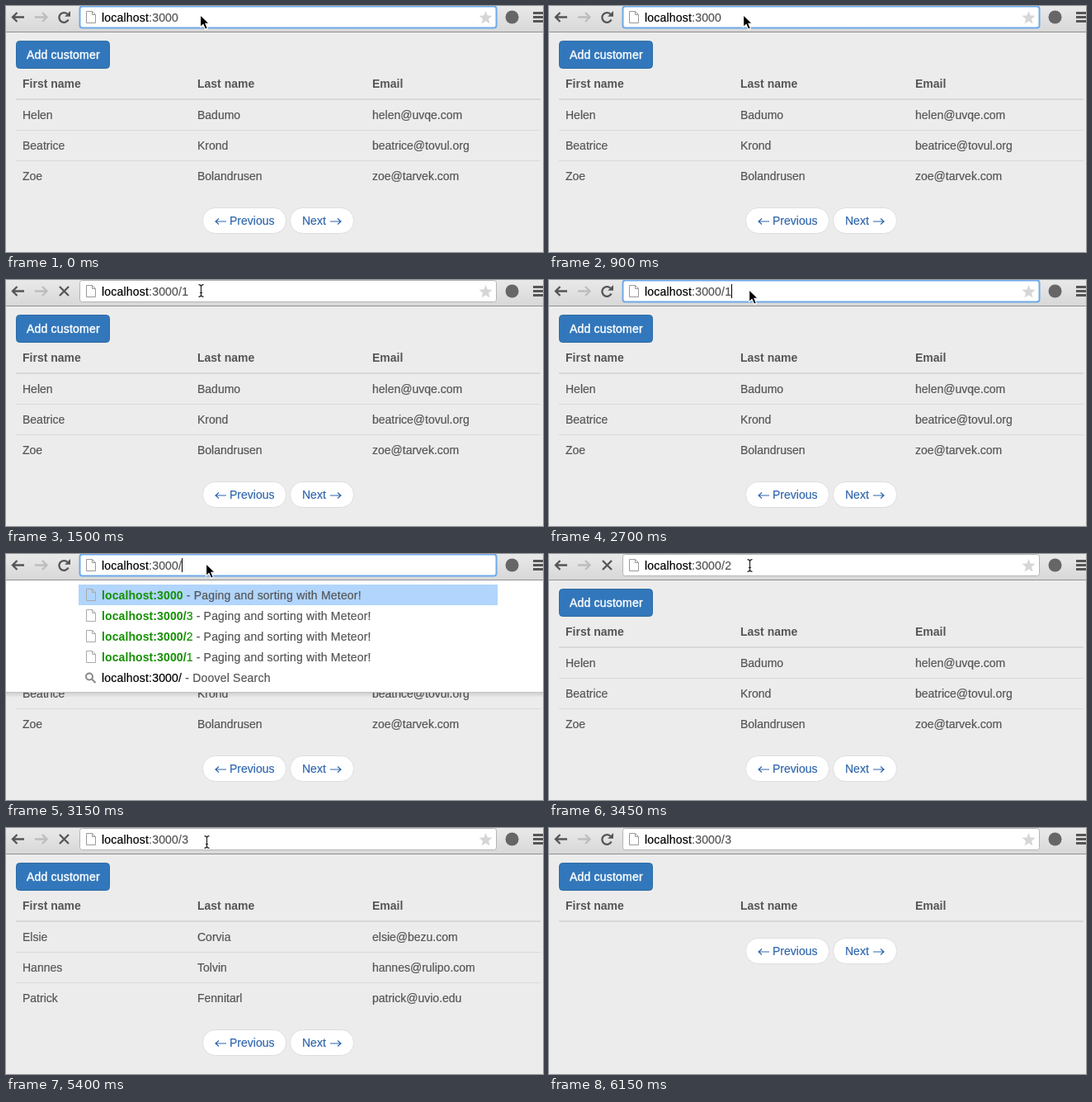
Write an HTML page that moves like this. It is 651 by 298 pixels and loops after 6580 ms.

```html
<!DOCTYPE html>
<html lang="en">
<head>
<meta charset="utf-8">
<title>Paging demo</title>
<style>
  html, body { margin: 0; width: 100%; height: 100%; overflow: hidden; background: #ececec; }
  svg { display: block; color: #555; }
  text { font: 14px "Liberation Sans", Arial, sans-serif; white-space: pre; }
  text, tspan { fill: currentColor; stroke: currentColor; stroke-width: .2px; }
  .bold { font-weight: bold; stroke-width: 0; }
  .wide { letter-spacing: .2px; }
  .black { color: #000; }
  .link { color: #2f66ad; }
  .label { color: #fff; letter-spacing: .2px; stroke-width: .4px; }
  .hit { color: #149000; letter-spacing: .1px; }
  .line { fill: none; stroke: #555; stroke-width: 2.3; }
  .pale { stroke: #bdbdbd; }
  .lens { stroke: #888; stroke-width: 2; }
  .arrow { stroke: #2f66ad; stroke-width: 1.2; }
</style>
</head>
<body>
<svg id="stage" width="651" height="298" viewBox="0 0 651 298"></svg>
<script>
const LOOP = 6580;
const TITLE = ' - Paging and sorting with Meteor!';
const PAGES = {
  first: [
    ['Helen', 'Badumo', 'helen@uvqe.com'],
    ['Beatrice', 'Krond', 'beatrice@tovul.org'],
    ['Zoe', 'Bolandrusen', 'zoe@tarvek.com']
  ],
  second: [
    ['Elsie', 'Corvia', 'elsie@bezu.com'],
    ['Hannes', 'Tolvin', 'hannes@rulipo.com'],
    ['Patrick', 'Fennitarl', 'patrick@uvio.edu']
  ],
  empty: []
};

const arrowAt = (x, y) => ({ cursor: 'arrow', x, y });
const beamAt = (x, y) => ({ cursor: 'beam', x, y });
const suggest = path => ({ path, menu: true, caret: true });
const load = (path, x, y) => ({ path, menu: false, focus: false, caret: false, busy: true, ...beamAt(x, y) });
const selectAll = (x, y) => ({ focus: true, selected: true, ...arrowAt(x, y) });
const deselect = { selected: false, caret: true };

// Each step changes part of the state at its time in ms.
const steps = [
  [0, { path: '', page: 'first', focus: true, ...arrowAt(235, 10) }],
  [300, { caret: true }],
  [900, { caret: false }],
  [1200, suggest('/')],
  [1350, suggest('/1')],
  [1500, load('/1', 233, 5)],
  [1650, { busy: false }],
  [1950, beamAt(240, 6)],
  [2250, selectAll(242, 11)],
  [2700, deselect],
  [3150, suggest('/')],
  [3300, suggest('/2')],
  [3450, load('/2', 240, 6)],
  [3600, { busy: false, page: 'second' }],
  [4050, beamAt(240, 9)],
  [4500, selectAll(242, 14)],
  [4950, deselect],
  [5250, suggest('/')],
  [5400, load('/3', 240, 9)],
  [5550, { busy: false, page: 'blank' }],
  [5700, { page: 'empty' }],
  [5850, arrowAt(638, 269)],
  [6000, arrowAt(643, 297)],
  [6150, { cursor: 'none' }]
];

const text = (x, y, content, cls = '') => `<text x="${x}" y="${y}" class="${cls}">${content}</text>`;
const span = (content, cls) => `<tspan class="${cls}">${content}</tspan>`;
const rect = (x, y, w, h, fill, more = '') =>
  `<rect x="${x}" y="${y}" width="${w}" height="${h}" fill="${fill}" ${more}/>`;
const line = (d, cls = '') => `<path class="line ${cls}" d="${d}"/>`;

const sheetIcon = (y, fill, stroke) =>
  `<path d="M97.5 ${y + .5}h7l4 4v10h-11zM104.5 ${y + .5}v4h4" fill="${fill}" stroke="${stroke}"/>`;

const CURSORS = {
  none: '',
  arrow: '<path d="M.6 .8V15.6L4 12.4 6.6 18.3 9.4 17.1 6.9 11.3H11.4Z" fill="#000" stroke="#fff" stroke-width="1.1"/>',
  beam: '<path d="M.5 .7Q3.5 .7 3.5 3V13Q3.5 15.3 .5 15.3M6.5 .7Q3.5 .7 3.5 3M6.5 15.3Q3.5 15.3 3.5 13M2 10.5H5" fill="none" stroke="#222" stroke-width="1.2"/>'
};

function star(cx, cy, r) {
  const points = Array.from({ length: 10 }, (_, i) => {
    const a = i * Math.PI / 5, d = i % 2 ? r * .43 : r;
    return `${cx + d * Math.sin(a)},${cy - d * Math.cos(a)}`;
  });
  return `<polygon points="${points.join(' ')}" fill="#d6d6d6"/>`;
}

function pageView(rows) {
  if (!rows) return '';
  const columns = [20, 232, 444];
  const cells = (labels, y, cls) => labels.map((label, i) => text(columns[i], y, label, cls)).join('');
  const top = 133.5 + rows.length * 37;
  const pill = (x, w) => rect(x + .5, top, w - 1, 31, '#fff', 'rx="15" stroke="#dedede"');
  return rect(12.5, 42.5, 113, 33, '#3277bb', 'rx="4" stroke="#2e6da4"') +
    text(25, 64, 'Add customer', 'label') +
    cells(['First name', 'Last name', 'Email'], 99, 'bold') +
    rect(12, 112, 636, 2, '#d8d8d8') +
    rows.map((row, i) => cells(row, 137 + i * 37) + (i ? rect(12, 113 + i * 37, 636, 1, '#dadada') : '')).join('') +
    pill(238, 102) + text(271, top + 20.5, 'Previous', 'link') +
    line(`M258 ${top + 13}l-4 3.5 4 3.5M254 ${top + 16.5}h13`, 'arrow') +
    pill(344, 78) + text(359, top + 20.5, 'Next', 'link') +
    line(`M402 ${top + 13}l4 3.5-4 3.5M406 ${top + 16.5}h-13`, 'arrow');
}

function toolbar(s) {
  const caretX = [209, 213, 221][s.path.length];
  const edge = s.focus ? 'stroke="#6fa9e8" stroke-width="2"' : 'stroke="#b4b4b4"';
  return rect(0, 0, 651, 31, 'url(#bar)') + rect(0, 31, 651, 1, '#909090') +
    line('M13.5 8L8 13.5l5.5 5.5M8 13.5H22') +
    line('M44 8l5.5 5.5-5.5 5.5M49.5 13.5H35', 'pale') +
    (s.busy ? line('M65 8l11 11M76 8l-11 11')
      : line('M75.6 16.5A5.9 5.9 0 1 1 74.5 9.8') + '<path d="M78 6v6.8h-6.8z" fill="#555"/>') +
    rect(89.5, .5, 505, 26, '#fff', `rx="3" ${edge}`) +
    sheetIcon(6, '#fff', '#999') +
    (s.selected ? rect(116, 5, caretX + 1 - 116, 17, '#b3d5fd') : '') +
    text(116, 19, span('localhost', 'black') + ':3000' + s.path, 'wide') +
    (s.caret ? rect(caretX, 5, 1, 17, '#000') : '') +
    (s.menu ? '' : star(581.5, 14.5, 8.5)) +
    '<circle cx="613.5" cy="13.5" r="8" fill="#666"/>' +
    [7, 12, 17].map(y => rect(639, y, 12, 3, '#555')).join('');
}

function suggestions(s) {
  if (!s.menu) return '';
  const typed = 'localhost:3000' + s.path;
  const hit = (bold, rest = '') =>
    span(bold, 'hit bold') + span(rest, 'hit') + span(TITLE, 'wide');
  const rows = s.path === '/'
    ? [hit('localhost:3000'), ...[3, 2, 1].map(n => hit(typed, n))]
    : [hit(typed)];
  const bottom = 42 + (rows.length + 1) * 25;
  const last = bottom - 17;
  return rect(0, 32, 651, bottom - 32, '#fff') +
    rect(0, bottom, 651, 1, '#c4c4c4') + rect(0, bottom + 1, 651, 6, 'url(#shade)') +
    rect(88, 37, 508, 25, '#b1d5fc') +
    rows.map((row, i) => sheetIcon(42 + i * 25, 'none', '#aaa') + text(116, 55 + i * 25, row)).join('') +
    `<circle cx="101" cy="${last - 1.5}" r="4" class="line lens"/>` +
    line(`M104 ${last + 1.5}l4.5 4.5`, 'lens') +
    text(116, last + 5, span(typed, 'black') + ' - Doovel Search', 'wide');
}

const DEFS = `<defs>
  <linearGradient id="bar" x2="0" y2="1"><stop stop-color="#e9e9e9"/><stop offset="1" stop-color="#d8d8d8"/></linearGradient>
  <linearGradient id="shade" x2="0" y2="1"><stop stop-opacity=".12"/><stop offset="1" stop-opacity="0"/></linearGradient>
</defs>`;

const stage = document.getElementById('stage');
let shown = 0;

function tick() {
  const time = performance.now() % LOOP;
  const count = steps.filter(([start]) => start <= time).length;
  if (count !== shown) {
    shown = count;
    const s = Object.assign({}, ...steps.slice(0, count).map(([, change]) => change));
    stage.innerHTML = DEFS + pageView(PAGES[s.page]) + toolbar(s) + suggestions(s) +
      `<g transform="translate(${s.x} ${s.y})">${CURSORS[s.cursor]}</g>`;
  }
  requestAnimationFrame(tick);
}
tick();
</script>
</body>
</html>
```
